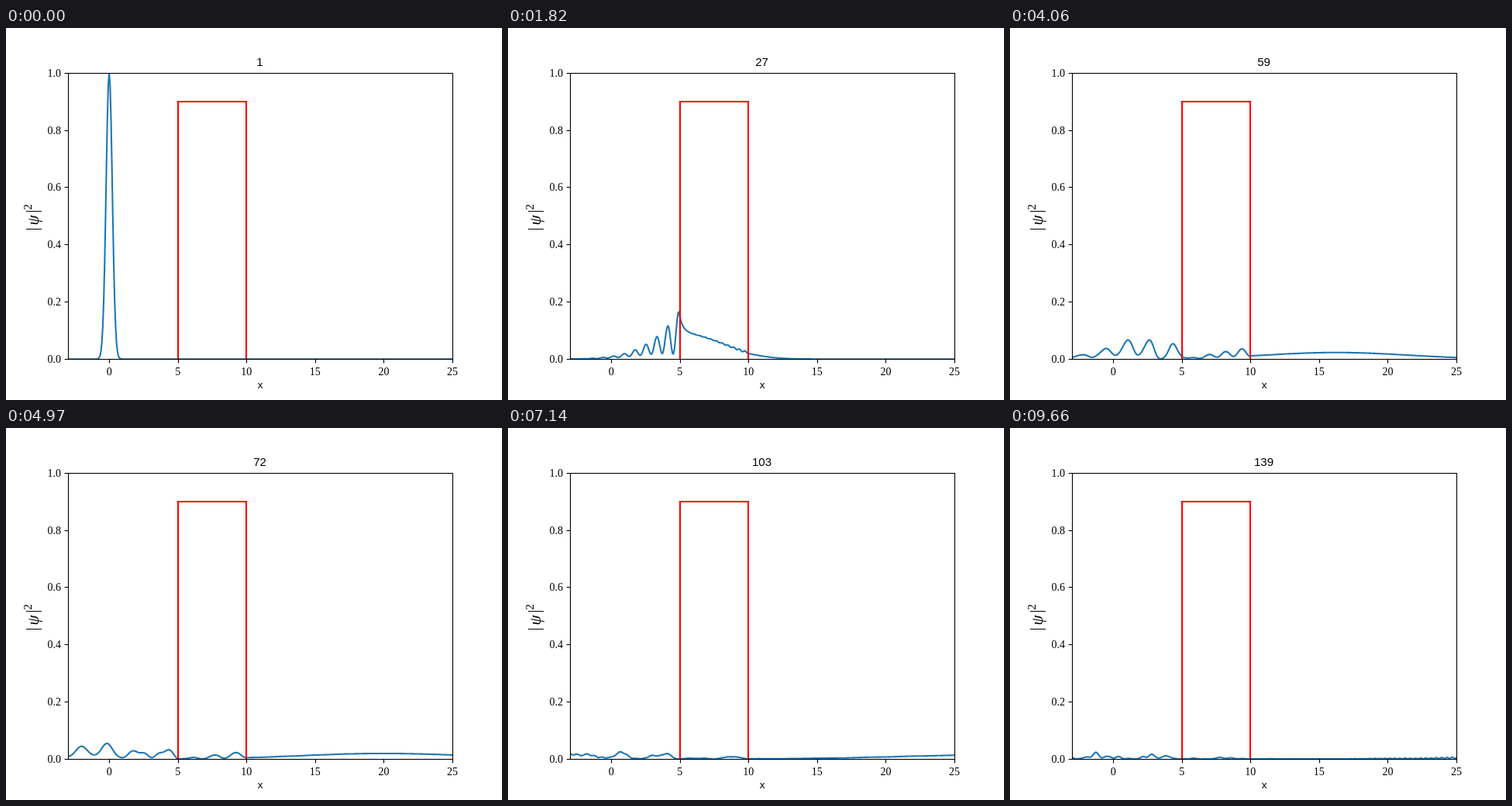
An HTML page with a canvas for the animation above (9.73 s loop, 640 by 480 pixels).

```html
<!DOCTYPE html>
<html lang="en">
<head>
<meta charset="utf-8">
<title>Wave packet at a barrier</title>
<style>
  html, body { margin: 0; width: 100%; height: 100%; overflow: hidden; background: #fff; }
  canvas { display: block; }
</style>
</head>
<body>
<canvas id="stage" width="640" height="480"></canvas>
<script>
const FRAMES = 139, FRAME_MS = 70;
const SERIF = '14px "Liberation Serif", serif';
const ctx = document.getElementById('stage').getContext('2d');

// Schrödinger equation in a box (hbar = m = 1), Crank-Nicolson steps.
const X_MIN = -15, X_MAX = 47, DX = 1 / 15;
const COUNT = Math.round((X_MAX - X_MIN) / DX) + 1;
const BARRIER = { from: 5, to: 10, height: 9 };
const MOMENTUM = 5, SUBSTEPS = 10, DT = 0.05 / SUBSTEPS;
const xs = Array.from({ length: COUNT }, (_, j) => X_MIN + j * DX);

function simulate() {
  const array = () => new Float64Array(COUNT);
  const re = array(), im = array(), yr = array(), yi = array(), cr = array(), ci = array();
  const off = -DT / (4 * DX * DX);

  xs.forEach((x, j) => {
    const envelope = Math.exp(-5 * x * x);
    re[j] = envelope * Math.cos(MOMENTUM * x);
    im[j] = envelope * Math.sin(MOMENTUM * x);
    const inside = x > BARRIER.from - DX / 2 && x < BARRIER.to - DX / 2;
    const energy = 1 / (DX * DX) + (inside ? BARRIER.height : 0);
    const a = 1 + (j ? off * off * cr[j - 1] : 0);
    const b = energy * DT / 2 + (j ? off * off * ci[j - 1] : 0);
    cr[j] = a / (a * a + b * b);
    ci[j] = -b / (a * a + b * b);
  });

  function step() {
    let pr = 0, pi = 0;
    for (let j = 0; j < COUNT; j++) {
      const u = 2 * re[j] + off * pi, v = 2 * im[j] - off * pr;
      yr[j] = pr = u * cr[j] - v * ci[j];
      yi[j] = pi = u * ci[j] + v * cr[j];
    }
    pr = pi = 0;
    for (let j = COUNT - 1; j >= 0; j--) {
      const tr = cr[j] * pr - ci[j] * pi, ti = cr[j] * pi + ci[j] * pr;
      pr = yr[j] + off * ti;
      pi = yi[j] - off * tr;
      re[j] = pr - re[j];
      im[j] = pi - im[j];
    }
  }

  const history = [];
  for (let n = 0; n < FRAMES; n++) {
    history.push(re.map((value, j) => value * value + im[j] * im[j]));
    for (let s = 0; s < SUBSTEPS; s++) step();
  }
  return history;
}

const densities = simulate();
const px = x => 80 + (x + 3) * 496 / 28;
const py = y => 427.2 - y * 369.6;
const snap = v => Math.floor(v + 0.5) + 0.5;

function line(color, width, ...points) {
  ctx.beginPath();
  points.forEach(([x, y]) => ctx.lineTo(x, y));
  ctx.strokeStyle = color;
  ctx.lineWidth = width;
  ctx.stroke();
}

function text(string, x, y, font, align = 'center') {
  ctx.font = font;
  ctx.textAlign = align;
  ctx.fillStyle = '#000';
  ctx.fillText(string, x, y);
}

function sideways(string, x, y, font) {
  ctx.save();
  ctx.translate(x, y);
  ctx.rotate(-Math.PI / 2);
  text(string, 0, 0, font);
  ctx.restore();
}

function drawCurves(density) {
  ctx.save();
  ctx.beginPath();
  ctx.rect(80, 58, 496, 369);
  ctx.clip();
  ctx.lineJoin = 'round';
  const points = xs.map((x, j) => [px(x), py(density[j])])
    .filter(([x]) => x > 70 && x < 586);
  line('#1f77b4', 2.083, ...points);
  ctx.lineJoin = 'miter';
  line('#f00', 2.083, [222, 428], [222, 95], [310, 95], [310, 428]);
  ctx.restore();
}

function drawAxes() {
  ctx.lineWidth = 1.11;
  ctx.strokeStyle = '#000';
  ctx.strokeRect(80.5, 58.5, 496, 369);
  for (let x = 0; x <= 25; x += 5) {
    const tick = snap(px(x));
    line('#000', 1.11, [tick, 427.5], [tick, 432.4]);
    text(x, px(x), 447.5, SERIF);
  }
  for (let i = 0; i <= 5; i++) {
    const tick = snap(py(i / 5));
    line('#000', 1.11, [75.6, tick], [80.5, tick]);
    text((i / 5).toFixed(1), 71, tick + 4.3, SERIF, 'right');
  }
  text('x', 328, 464.5, '13.5px "Liberation Sans", sans-serif');

  line('#000', 1, [26, 259.5], [46, 259.5]);
  line('#000', 1, [26, 236.5], [46, 236.5]);
  sideways('ψ', 41.5, 248, 'italic 21px "Liberation Serif", serif');
  sideways('2', 33, 231, '15px "Liberation Serif", serif');
}

function draw(now) {
  const index = Math.floor(now / FRAME_MS) % FRAMES;
  ctx.fillStyle = '#fff';
  ctx.fillRect(0, 0, 640, 480);
  drawCurves(densities[index]);
  drawAxes();
  text(index + 1, 327.5, 49, '15px "Liberation Sans", sans-serif');
}

const start = performance.now();
function tick() {
  draw(performance.now() - start);
  requestAnimationFrame(tick);
}
tick();
</script>
</body>
</html>
```
